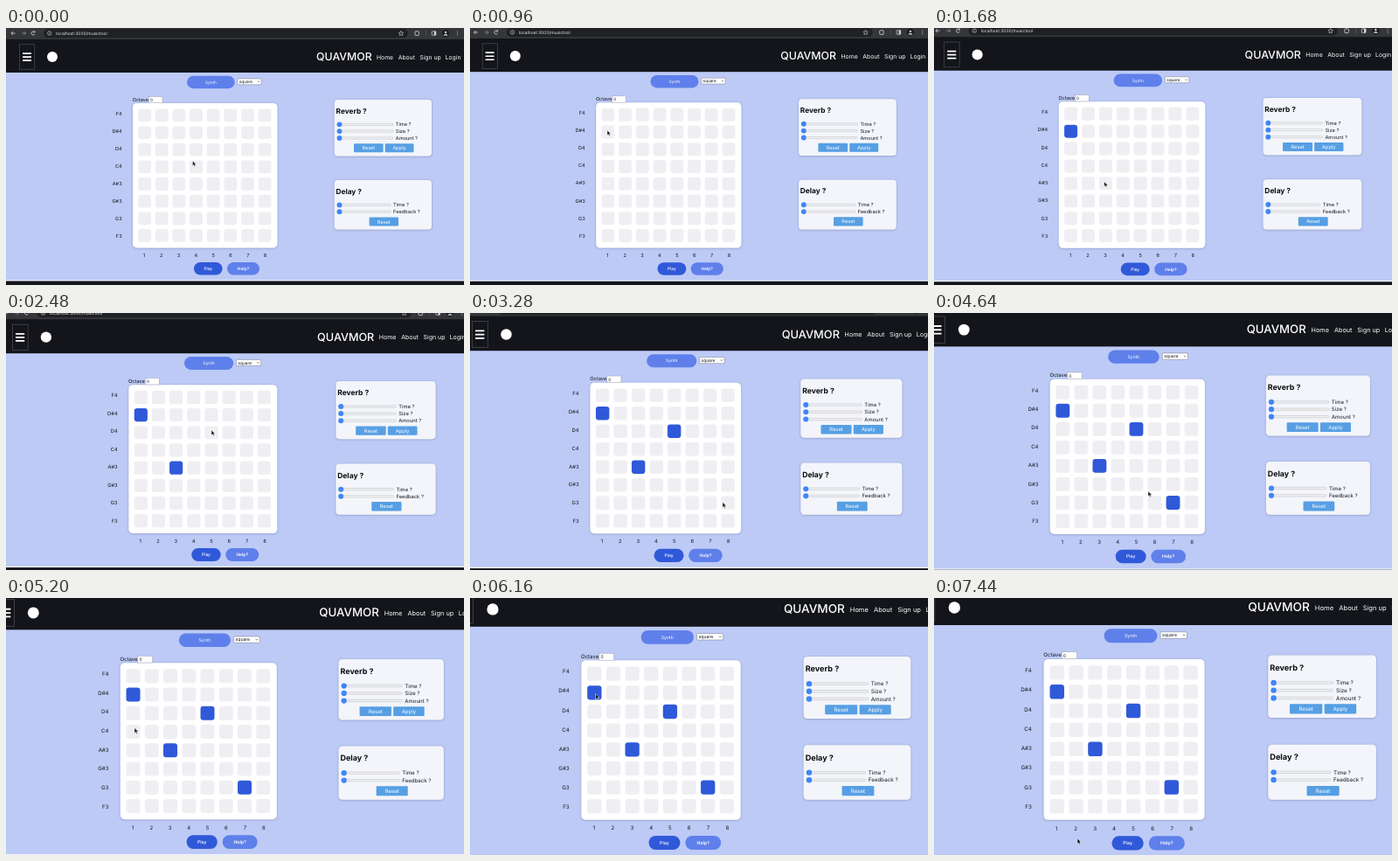
Animation of 524x294 px, one loop 7.52 s. Source, as an HTML page:

```html
<!DOCTYPE html>
<html lang="en">
<head>
<meta charset="utf-8">
<title>Music tool</title>
<style>
  html, body { margin: 0; width: 100%; height: 100%; overflow: hidden; background: #bdcaf6; }
  svg { display: block; width: 524px; height: 294px; }
  text { font-family: Inter, "Open Sans", sans-serif; text-rendering: geometricPrecision; }
</style>
</head>
<body>
<svg id="stage" viewBox="0 0 524 294">
  <defs>
    <filter id="soft" x="-10%" y="-10%" width="120%" height="120%">
      <feDropShadow dx="0" dy="0.4" stdDeviation="0.9" flood-color="#4b5680" flood-opacity="0.5"/>
    </filter>
  </defs>
  <g id="page"></g>
  <path id="cursor" d="M0 0V6.3L1.5 5L2.4 7.1L3.5 6.6L2.6 4.6H4.5Z"
        fill="#111" stroke="#fff" stroke-width="0.5" stroke-linejoin="round"/>
</svg>
<script>
const LOOP = 7520, STEP = 80;
const ORIGIN = { x: 318, y: 229.5 };
const BLUE = "#3059d9", SOFT_BLUE = "#5f80ea", SKY = "#569fe4", CELL = "#efeff3", INK = "#14161c", NAV = "#13151a";

// time, extra scale
const ZOOM = [[0, 0], [1680, .0128], [3280, .0435], [4080, .0595], [5200, .082], [6160, .102], [7440, .112]];

// time, x, y of the pointer tip
const POINTER = [
  [0, 213.5, 152], [320, 213.5, 152], [960, 157, 117], [1200, 157, 117],
  [1680, 194.8, 175.8], [1920, 194.8, 175.8], [2400, 235, 134], [2640, 235, 134],
  [3280, 289, 216.5], [3680, 273, 217.5], [4080, 272, 219], [4400, 272, 219],
  [5200, 147, 148.5], [5680, 143, 110], [6160, 143.5, 109.5], [6640, 143.5, 109.5],
  [7440, 164, 275]
];

// row, column, time switched on
const NOTES = [[1, 0, 1040], [4, 2, 1840], [2, 4, 2560], [6, 6, 3760]];

const page = document.getElementById("page");
const cursor = document.getElementById("cursor");

function add(tag, attrs) {
  const node = document.createElementNS("http://www.w3.org/2000/svg", tag);
  for (const key in attrs) node.setAttribute(key, attrs[key]);
  return page.appendChild(node);
}
const rect = (x, y, width, height, fill, rx = 0, more = {}) =>
  add("rect", { x, y, width, height, fill, rx, ...more });
const line = (d, stroke, width, more = {}) =>
  add("path", { d, stroke, "stroke-width": width, fill: "none", ...more });
const dot = (cx, cy, r, fill, more = {}) => add("circle", { cx, cy, r, fill, ...more });
function label(str, x, y, size, fill = INK, anchor = "start", weight = 400) {
  add("text", { x, y, "font-size": size, fill, "text-anchor": anchor, "font-weight": weight }).textContent = str;
}
function button(str, x, y, w, h, fill, r, size, weight = 400) {
  rect(x, y, w, h, fill, r);
  label(str, x + w / 2, y + h / 2 + size * .36, size, "#fff", "middle", weight);
}

function drawBrowser() {
  const grey = "#d5d7db";
  rect(0, 0, 524, 14, "#35363a");
  rect(43, .8, 417, 10.4, "#202124", 5.2);
  line("M10.5 6H6M8 3.9L5.9 6L8 8.1", grey, .8);
  line("M18 6H22.5M20.5 3.9L22.6 6L20.5 8.1", "#8b8d91", .8);
  line("M32.8 4.6A2.1 2.1 0 1 0 33 7M33 3.3V5H31.2", grey, .8);
  dot(49.7, 6, 2.2, "none", { stroke: grey, "stroke-width": .6 });
  line("M49.7 5.7V7.2M49.7 4.6V5.1", grey, .6);
  label("localhost:3000/musictool", 57, 7.8, 4.9, "#e6e7ea");
  line("M452 3.4L452.8 5.2L454.7 5.4L453.3 6.7L453.7 8.6L452 7.6L450.3 8.6L450.7 6.7L449.3 5.4L451.2 5.2Z", grey, .6);
  rect(468, 3.8, 4.4, 4.6, "none", .7, { stroke: grey, "stroke-width": .8 });
  rect(480, 3, .5, 6, "#66686d");
  rect(487.2, 3.8, 4.6, 4.4, "none", .5, { stroke: grey, "stroke-width": .7 });
  rect(489.8, 3.8, 2, 4.4, grey);
  dot(503, 6, 4.2, "#1c1d20");
  dot(503, 4.9, 1.2, grey);
  line("M500.8 8.3Q503 5.8 505.2 8.3Z", grey, .5, { fill: grey });
  for (const y of [4, 6, 8]) dot(516.5, y, .5, grey);
}

function drawNav() {
  rect(-10, 13, 544, 38, NAV);
  rect(15.6, 18.8, 17.2, 28.4, "none", 0, { stroke: "#55575c", "stroke-width": .6 });
  for (const y of [28.3, 32.3, 36.3]) rect(19, y, 10, 1.7, "#fff", .3);
  dot(53, 33, 6, "#fff");
  label("QUAVMOR", 418.6, 37, 12.3, "#fff", "end", 500);
  [["Home", 424], ["About", 448.7], ["Sign up", 473.3], ["Login", 502.7]]
    .forEach(([str, x]) => label(str, x, 35.7, 6.8, "#fff"));
}

function drawSequencer() {
  button("Synth", 207, 54.8, 54.7, 14.4, SOFT_BLUE, 7.2, 4.7);
  rect(265, 58, 27.3, 6.8, "#fff", .8, { stroke: "#777b88", "stroke-width": .5 });
  label("square", 266.8, 63, 4.7);
  line("M288 60.7L289.2 62L290.4 60.7", "#333", .5);

  rect(145, 86, 165.4, 165.4, "#fff", 4.5, { filter: "url(#soft)" });
  label("Octave", 144.7, 83.8, 5.5);
  rect(163.5, 78.6, 15.5, 7.2, "#fff", 0, { stroke: "#8d93a8", "stroke-width": .4 });
  label("0", 165, 84, 4.6);

  const cells = [];
  ["F4", "D#4", "D4", "C4", "A#3", "G#3", "G3", "F3"].forEach((name, row) => {
    label(name, 132.6, 99.7 + row * 20, 5.6, INK, "end");
    label(row + 1, 158 + row * 19.8, 262, 5.6, INK, "middle");
    cells.push(Array.from({ length: 8 }, (_, col) =>
      rect(151.2 + col * 19.64, 92.5 + row * 19.65, 14.8, 14.8, CELL, 3)));
  });

  button("Play", 215, 268, 32.6, 14.6, BLUE, 7.3, 4.8, 500);
  button("Help?", 253, 268, 37, 14.6, SOFT_BLUE, 7.3, 4.8, 600);
  return cells;
}

function drawPanel(title, y, h, sliders, trackEnd) {
  rect(375.8, y, 111.2, h, "#f3f5fa", 4, { filter: "url(#soft)" });
  label(title, 377.6, y + 15.6, 8.25, "#0b0c10", "start", 700);
  sliders.forEach(([name, sy]) => {
    rect(379, sy - 1.1, trackEnd - 379, 2.2, "#f1f1f1", 1.1, { stroke: "#b4b6bc", "stroke-width": .45 });
    dot(381.5, sy, 2.9, "#3f86f5");
    label(name, trackEnd + 2.8, sy + 2, 5.65);
  });
}

drawBrowser();
rect(-10, 51, 544, 237.6, "#bdcaf6");
drawNav();
const cells = drawSequencer();
drawPanel("Reverb ?", 82, 64.4, [["Time ?", 110.3], ["Size ?", 118.1], ["Amount ?", 126]], 443);
drawPanel("Delay ?", 174, 56.6, [["Time ?", 202.4], ["Feedback ?", 210.2]], 440.3);
button("Reset", 398, 132.2, 33.6, 10, SKY, 1, 5.6);
button("Apply", 433.7, 132.2, 32.8, 10, SKY, 1, 5.6);
button("Reset", 415.6, 216.4, 33.4, 10.2, SKY, 1, 5.6);
rect(-10, 288.2, 544, 1.4, "#f4f6fc");
rect(-10, 289.5, 544, 12, NAV);

function segment(table, t) {
  let i = 0;
  while (i < table.length - 2 && t >= table[i + 1][0]) i++;
  const u = (t - table[i][0]) / (table[i + 1][0] - table[i][0]);
  return [i, Math.min(1, u)];
}

// Cubic curve through the zoom points, level at both ends
function zoomAt(t) {
  const [i, u] = segment(ZOOM, t);
  const slope = k => k === 0 || k === ZOOM.length - 1 ? 0 :
    (ZOOM[k + 1][1] - ZOOM[k - 1][1]) / (ZOOM[k + 1][0] - ZOOM[k - 1][0]);
  const [t0, a] = ZOOM[i], [t1, b] = ZOOM[i + 1], d = t1 - t0, v = 1 - u;
  return 1 + a * (1 + 2 * u) * v * v + b * u * u * (3 - 2 * u)
    + d * u * v * (slope(i) * v - slope(i + 1) * u);
}

function pointerAt(t) {
  const [i, u] = segment(POINTER, t), e = u * u * (3 - 2 * u);
  const [, x0, y0] = POINTER[i], [, x1, y1] = POINTER[i + 1];
  return [x0 + (x1 - x0) * e, y0 + (y1 - y0) * e];
}

function render(t) {
  const s = zoomAt(t), [x, y] = pointerAt(t);
  page.setAttribute("transform",
    `translate(${ORIGIN.x * (1 - s)} ${ORIGIN.y * (1 - s)}) scale(${s})`);
  cursor.setAttribute("transform", `translate(${x} ${y}) scale(${s * .9})`);
  for (const [row, col, on] of NOTES) cells[row][col].setAttribute("fill", t >= on ? BLUE : CELL);
}

const start = performance.now();
function tick() {
  const t = (performance.now() - start) % LOOP;
  render(Math.floor(t / STEP) * STEP);
  requestAnimationFrame(tick);
}
tick();
</script>
</body>
</html>
```
